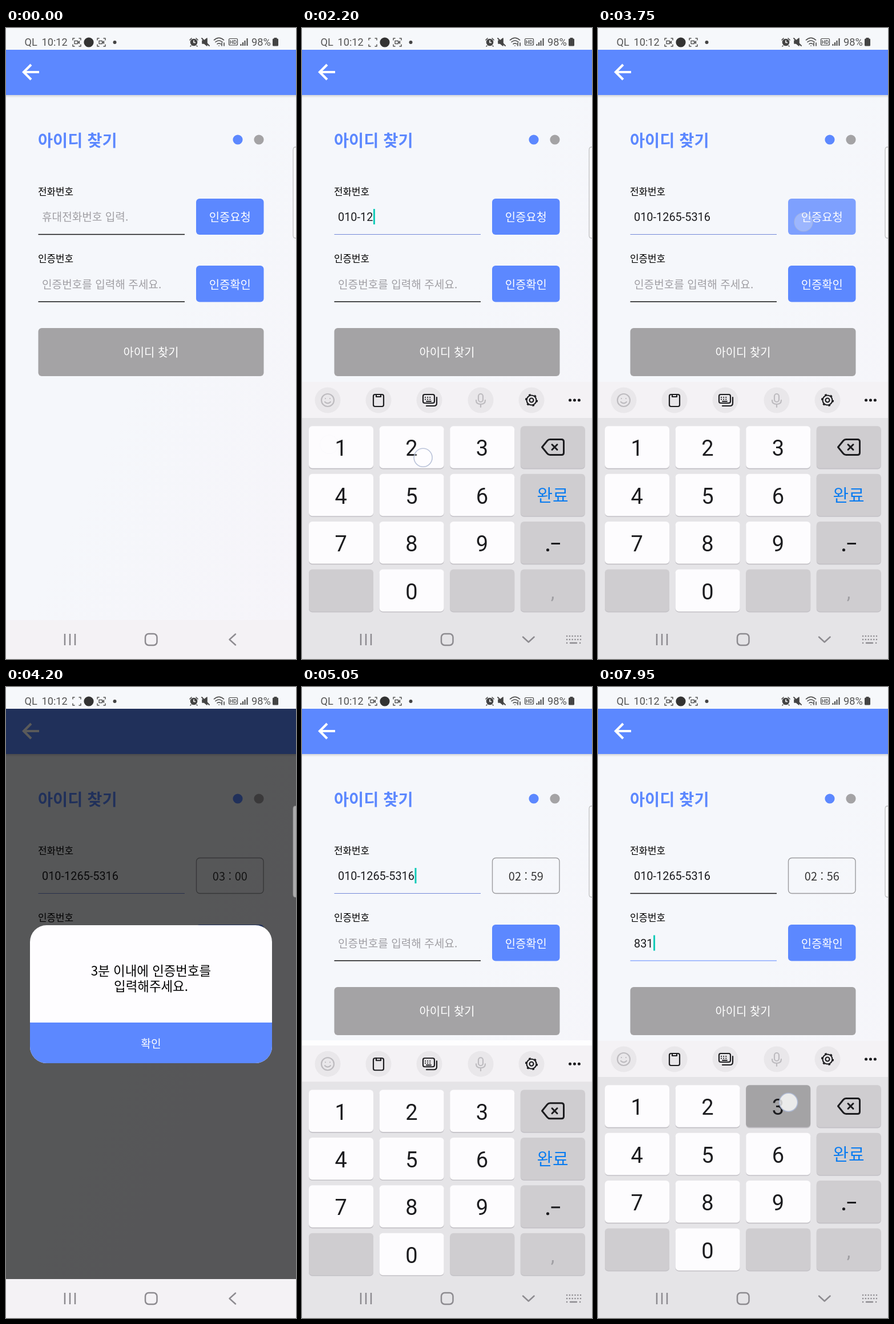
Recreate the animation shown at these times as an HTML page. Size 508 px wide and 1102 px high, loop 8 s.

```html
<!DOCTYPE html>
<html lang="ko">
<head>
<meta charset="utf-8">
<style>
  html, body { margin: 0; width: 100%; height: 100%; overflow: hidden; background: #f5f7fb; }
  svg { display: block; width: 100%; height: 100%; }
  text { font-family: "Noto Sans CJK KR", "Noto Sans CJK", sans-serif; font-size: 19.9px; }
  .roboto { font-family: Roboto, sans-serif; }
  .mid { text-anchor: middle; }
  .label { font-size: 16.9px; }
  .hint { font-size: 19.1px; fill: #a09fa4; }
  .status { font-size: 18.2px; fill: #555; }
  .digit { font-size: 38px; fill: #1c1c1f; }
  .line { fill: none; stroke-linecap: round; stroke-linejoin: round; }
  .tool { stroke: #1d1d20; stroke-width: 2.2; }
  .faint { stroke: #bdbbbf; }
  .nav { stroke: #8d8b90; stroke-width: 2.5; }
</style>
</head>
<body>
<svg viewBox="0 0 508 1102">
  <defs>
    <linearGradient id="page" x2="1" y2="1">
      <stop offset=".5" stop-color="#f5f7fb"/><stop offset="1" stop-color="#f6f4f9"/>
    </linearGradient>
    <linearGradient id="shade" x2="0" y2="1">
      <stop stop-color="#000" stop-opacity=".14"/><stop offset="1" stop-color="#000" stop-opacity="0"/>
    </linearGradient>
    <path id="brackets" class="line" stroke="#555" stroke-width="1.5"
      d="M-7-4v-3h3M4-7h3v3M7 4v3h-3M-4 7h-3v-3"/>
    <path id="camera" class="line" stroke="#555" stroke-width="1.4" d="M-4-2.5h5.500v5h-5.500zM2 0l2.500-2v4z"/>
    <clipPath id="card"><rect x="42" y="416" width="424" height="241" rx="29"/></clipPath>
  </defs>

  <rect width="508" height="1102" fill="url(#page)"/>
  <rect y="38" width="508" height="79" fill="#5c88ff"/>
  <rect y="117" width="508" height="5" fill="url(#shade)"/>
  <path d="M58 77H31M44 64L31 77l13 13" fill="none" stroke="#fff" stroke-width="4.200"/>
  <text x="56" y="206.500" font-size="28.400" font-weight="700" fill="#5c88ff" style="font-size:28.4px">아이디 찾기</text>
  <circle cx="406" cy="195" r="8.600" fill="#5c88ff"/>
  <circle cx="443" cy="195" r="8.600" fill="#a4a3a5"/>

  <text class="label" x="56" y="291.500">전화번호</text>
  <text class="hint" id="phoneHint" x="63" y="337.300">휴대전화번호 입력.</text>
  <text class="roboto" id="phone" x="63" y="337.200" fill="#1c1c1f"></text>
  <path id="line1" d="M56.500 360.500H313"/>
  <g id="request">
    <rect x="333" y="298" width="118.500" height="63" rx="6" fill="#5c88ff"/>
    <text class="mid" x="392.300" y="338.300" fill="#fff">인증요청</text>
  </g>
  <g id="timer">
    <rect x="333.500" y="298.500" width="117.500" height="62" rx="6" fill="none" stroke="#9b9b9e" stroke-width="1.400"/>
    <text class="mid" id="clock" x="392.300" y="338.300" fill="#333"></text>
  </g>

  <text class="label" x="56" y="408.800">인증번호</text>
  <text class="hint" id="codeHint" x="63" y="454.500">인증번호를 입력해 주세요.</text>
  <text class="roboto" id="code" x="63" y="454.500" fill="#1c1c1f"></text>
  <path id="line2" d="M56.500 478H313"/>
  <rect x="333" y="415" width="118.500" height="63.500" rx="6" fill="#5c88ff"/>
  <text class="mid" x="392.300" y="455.500" fill="#fff">인증확인</text>
  <rect id="caret" width="3" height="27" fill="#12cbb8"/>

  <rect x="56.500" y="524" width="395" height="84" rx="6" fill="#a4a3a5"/>
  <text class="mid" x="254" y="574.300" fill="#fff">아이디 찾기</text>

  <g id="modal">
    <rect y="38" width="508" height="996" fill="#000" opacity=".647"/>
    <g clip-path="url(#card)">
      <rect x="42" y="416" width="424" height="241" fill="#fefdff"/>
      <rect x="42" y="586" width="424" height="71" fill="#5c88ff"/>
    </g>
    <text class="mid" x="254" y="503.500" style="font-size:22.4px">3분 이내에 인증번호를</text>
    <text class="mid" x="254" y="530.500" style="font-size:22.4px">입력해주세요.</text>
    <text class="mid" x="254" y="629.500" fill="#fff" style="font-size:19.2px">확인</text>
  </g>

  <path d="M509 208h-2q-4 0-4 5v149q0 5 4 5h2z" fill="#fff" fill-opacity=".5" stroke="#999" stroke-opacity=".6" stroke-width="1.300"/>

  <rect id="gap" y="617" width="508" height="485" fill="#fefeff"/>
  <g id="keyboard">
    <rect y="618" width="508" height="64" fill="#f4f2f5"/>
    <rect y="681" width="508" height="421" fill="#e5e4e7"/>
    <g id="bubbles" fill="#e9e7ea"></g>
    <g class="line tool">
      <g class="faint">
        <circle cx="45" cy="650" r="11"/><path d="M41 647v.1M49 647v.1M40 653q5 5 10 0"/>
        <rect x="309" y="639" width="8" height="14" rx="4"/><path d="M305 650q0 7 8 7t8-7M313 657v5"/>
      </g>
      <rect x="125" y="640" width="18" height="21" rx="3"/><path d="M130 640v4h8v-4"/>
      <rect x="212" y="640" width="20" height="15" rx="3"/><path d="M236 645v10q0 5-5 5h-13"/>
      <path d="M216 645h12M216 648.500h12" stroke-dasharray=".1 4"/><path d="M218 652h8" stroke-width="1.800"/>
      <circle cx="402" cy="650" r="3.500"/>
      <circle cx="402" cy="650" r="8.500"/>
      <circle cx="402" cy="650" r="10" stroke-dasharray="3.500 6.970" stroke-linecap="butt"/>
      <path d="M469.500 650h16" stroke-width="5" stroke-dasharray=".1 7.800"/>
    </g>
    <g id="keys"></g>
    <g class="line" stroke="#1c1c1f" stroke-width="3">
      <path d="M420.500 732l9-11q2-2.500 5-2.500h20q4 0 4 4v19q0 4-4 4h-20q-3 0-5-2.500zM438 727.500l9 9M447 727.500l-9 9"/>
      <path d="M436.500 900.500h15.500" stroke-linecap="butt"/>
    </g>
    <text class="mid" x="439" y="827" fill="#0a7cf0" style="font-size:30px">완료</text>
    <circle cx="430.500" cy="911.500" r="2.600" fill="#1c1c1f"/>
    <text class="digit mid roboto" x="439" y="997" style="fill:#a09fa3;font-size:34px">,</text>
  </g>

  <rect id="navBar" y="1034" width="508" height="68"/>
  <g class="line nav">
    <path d="M103 1058v20M112 1058v20M121 1058v20" stroke-linecap="butt"/>
    <rect x="244" y="1058" width="20.500" height="20" rx="6"/>
    <path id="back" d="M402 1058.500l-10.500 9.500 10.500 9.500"/>
    <g id="kbNav">
      <path d="M387 1063.500l9.800 9 9.800-9"/>
      <path d="M464 1062h24M464 1068h24" stroke-dasharray=".1 4.700"/>
      <path d="M464 1074h.1M470 1074h11M487 1074h.1"/>
    </g>
  </g>

  <g id="status">
    <rect width="508" height="38" fill="#f6f8fb"/>
    <text class="status roboto" x="32.500" y="31">QL</text>
    <text class="status roboto" x="62.500" y="31">10:12</text>
    <use href="#brackets" x="124" y="25"/><use href="#camera" id="blink" x="124" y="25"/>
    <circle cx="145" cy="25" r="8.600" fill="#333"/>
    <use href="#brackets" x="167" y="25"/><use href="#camera" x="167" y="25"/>
    <circle cx="190.500" cy="25" r="3" fill="#444"/>
    <g class="line" stroke="#444" stroke-width="1.600">
      <circle cx="329" cy="25" r="5.500" fill="#444"/><path d="M322 21l3-3M336 21l-3-3M324 31l-1 1M334 31l1 1"/>
      <path d="M329 22v3.500h2.500" stroke="#fff"/>
      <path d="M344 22h3l5-4v13l-5-4h-3z" fill="#444"/><path d="M343 18l13 13" stroke-width="1.800"/>
      <path d="M364.500 21q8.500-7.500 17 0M367 24.500q6-5 12 0M370 28q3-2.500 6 0M373 31v.1M378 26v5M382 31v-5"/>
      <rect x="390.500" y="18.500" width="15" height="11.500" rx="2" stroke-width="1.200"/>
      <path d="M411.500 31v-3M415 31v-6M418.500 31v-9M422.500 31v-13" stroke-width="2" stroke-linecap="butt"/>
    </g>
    <text class="mid roboto" x="398" y="27.700" fill="#444" font-weight="500" style="font-size:9px">HD</text>
    <text class="status roboto" x="430" y="31">98%</text>
    <path d="M467 20q0-1.500 1.500-1.500h1V17h5v1.500h1q1.500 0 1.500 1.500v10q0 1.500-1.500 1.500h-7q-1.500 0-1.500-1.500z" fill="#444"/>
  </g>
  <g id="touches"></g>
</svg>

<script>
const LOOP = 8000;
const NS = "http://www.w3.org/2000/svg";
const $ = id => document.getElementById(id);
const add = (parent, tag, attrs) => {
  const el = document.createElementNS(NS, tag);
  for (const k in attrs) el.setAttribute(k, attrs[k]);
  return parent.appendChild(el);
};
const ramp = (t, a, b) => Math.min(1, Math.max(0, (t - a) / (b - a)));
const show = (el, on) => { el.style.display = on ? "" : "none"; };

// Keyboard
for (const cx of [45, 134, 223, 313, 402]) add($("bubbles"), "circle", { cx, cy: 650, r: 22.5 });
const LAYOUT = ["123<", "456D", "789.", " 0 ,"];
const keys = {};
LAYOUT.forEach((row, r) => [...row].forEach((name, c) => {
  const x = 12 + c * 123.6, y = 695.3 + r * 83.4, size = { x, width: 113, height: 73.5, rx: 6 };
  const isDigit = /\d/.test(name);
  add($("keys"), "rect", { ...size, y: y + 1.6, fill: "#c3c1c6" });
  const face = add($("keys"), "rect", { ...size, y, fill: isDigit ? "#fdfcfe" : "#cfcdd0" });
  if (!isDigit) return;
  add($("keys"), "text", { class: "digit mid roboto", x: x + 56.3, y: y + 52 }).textContent = name;
  keys[name] = { face, x: x + 56.5, y: y + 37 };
}));

// Timeline of finger contacts
const OFFSETS = { 1: [-21, -5], 2: [20, 18], 3: [18, -7] };
const tapKey = (digit, down, up) => {
  const [dx, dy] = OFFSETS[digit] || [8, 4];
  return { digit, down, up, x: keys[digit].x + dx, y: keys[digit].y + dy };
};
const phoneTaps = [..."01012655316"].map((d, i) => tapKey(d, 1500 + i * 160, 1555 + i * 160));
const codeTaps = [tapKey("8", 6330, 6440), tapKey("3", 6830, 6900), tapKey("1", 7550, 7650), tapKey("3", 7900, 8050)];
const keyTaps = [...phoneTaps, ...codeTaps];
const FOCUS_1 = 700, FOCUS_2 = 5440, MODAL_CLOSED = 4790;
const taps = [
  { x: 190, y: 332, down: 600, up: 690 },
  { x: 360, y: 339, down: 3600, up: 3700 },
  { x: 262, y: 624, down: 4550, up: 4640 },
  { x: 150, y: 449, down: 5300, up: 5430 },
  ...keyTaps
];
for (const tap of taps) {
  tap.dot = add($("touches"), "circle", { cx: tap.x, cy: tap.y, r: 16, fill: "#fff", stroke: "#aeb9d3", "stroke-width": 1.6 });
}
const caretResets = [FOCUS_1, MODAL_CLOSED, FOCUS_2, ...keyTaps.map(k => k.up)];

const typed = (list, t) => list.filter(k => t >= k.up).map(k => k.digit).join("");
const hyphenate = d => [d.slice(0, 3), d.slice(3, 7), d.slice(7)].filter(Boolean).join("-");

function drawField(name, value, line, focused, focusColor) {
  $(name).textContent = value;
  show($(name + "Hint"), !value);
  $(line).setAttribute("stroke", focused ? focusColor : "#111");
  $(line).setAttribute("stroke-width", focused ? 1.2 : 1.4);
}

function drawKeyboard(t) {
  const start = t < 4000 ? FOCUS_1 : 4850;
  const rising = 486 * (1 - ramp(t, start, start + 250)) ** 2.5;
  const falling = t < 4000 ? 486 * ramp(t, 3760, 3890) : 0;
  const open = t >= start && falling < 486;
  $("keyboard").setAttribute("transform", `translate(0 ${rising + falling})`);
  show($("keyboard"), open);
  show($("gap"), open && rising > 0.3);
  show($("kbNav"), open);
  show($("back"), !open);
  $("navBar").setAttribute("fill", open ? "#e5e4e7" : "#f4f2f5");
  for (const d in keys) {
    const pressed = keyTaps.some(k => k.digit === d && t >= k.down && t < k.up);
    keys[d].face.setAttribute("fill", pressed ? "#a4a3a5" : "#fdfcfe");
  }
}

function drawTouches(t) {
  for (const { dot, down, up } of taps) {
    const fade = 1 - ramp(t, up, up + 200);
    show(dot, t >= down && fade > 0);
    dot.setAttribute("fill-opacity", t < up ? 0.78 : 0.32 * fade);
    dot.setAttribute("stroke-opacity", t < up ? 1 : 0.9 * fade * fade);
  }
}

function draw(t) {
  const focus = t >= FOCUS_2 ? 2 : t >= FOCUS_1 ? 1 : 0;
  drawField("phone", hyphenate(typed(phoneTaps, t)), "line1", focus === 1, "#7388d8");
  drawField("code", typed(codeTaps, t), "line2", focus === 2, "#5c88ff");

  const modal = ramp(t, 3800, 3900) - ramp(t, 4650, MODAL_CLOSED);
  show($("modal"), modal > 0);
  $("modal").setAttribute("opacity", modal);

  const sinceReset = t - Math.max(...caretResets.filter(r => r <= t));
  show($("caret"), focus && modal === 0 && Math.floor(sinceReset / 500) % 2 === 0);
  if (focus) {
    const field = $(focus === 1 ? "phone" : "code");
    $("caret").setAttribute("x", 63.5 + (field.textContent ? field.getComputedTextLength() : 0));
    $("caret").setAttribute("y", focus === 1 ? 316 : 433.5);
  }

  const counting = t >= 3850;
  show($("request"), !counting);
  show($("timer"), counting);
  $("request").setAttribute("opacity", 1 - 0.45 * ramp(t, 3600, 3650) * (1 - ramp(t, 3650, 3850)));
  const left = 180 - Math.max(0, Math.floor((t - 3650) / 1000));
  $("clock").textContent = [Math.floor(left / 60), left % 60].map(n => String(n).padStart(2, "0")).join(" : ");

  const phase = t % 1000;
  show($("blink"), phase < 150 || phase >= 650);
  drawKeyboard(t);
  drawTouches(t);
}

const begin = performance.now();
function tick() {
  draw((performance.now() - begin) % LOOP);
  requestAnimationFrame(tick);
}
tick();
</script>
</body>
</html>
```
